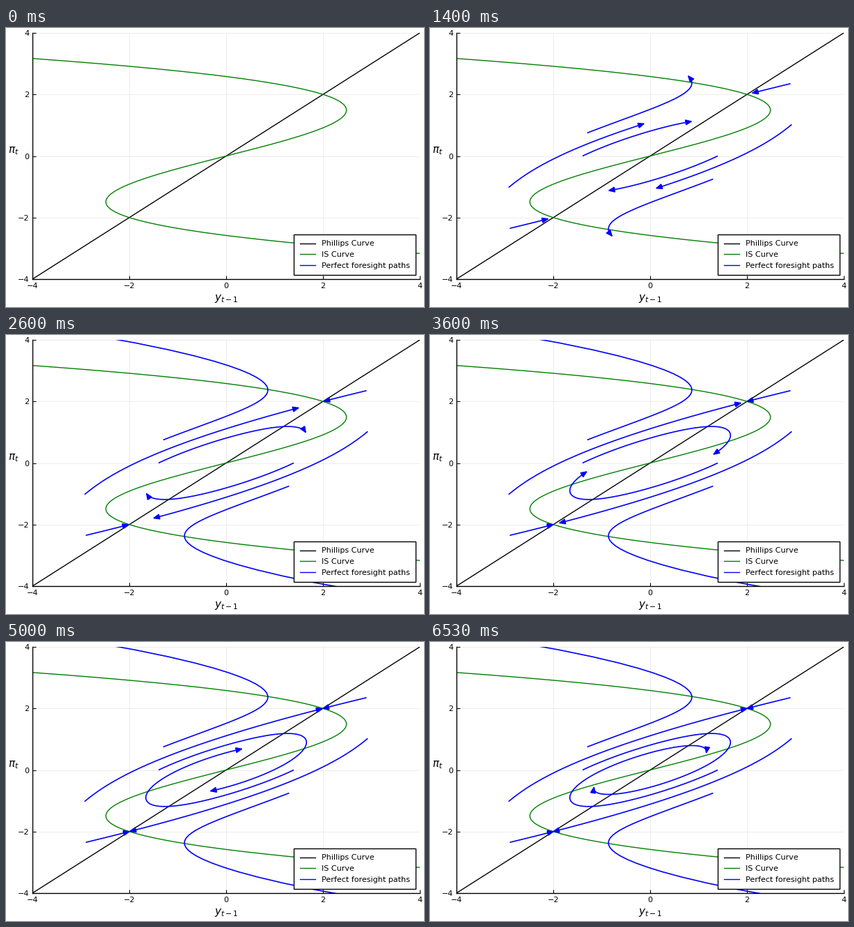
A matplotlib script that plays this animation: 600x400 px, repeating every 6.59 s.

```python
import matplotlib.pyplot as plt
import numpy as np
from matplotlib.animation import FuncAnimation
from matplotlib.patches import Polygon

FRAMES, LOOP_MS = 99, 6590
W, H, DPI = 600, 400, 100
LEFT, RIGHT, TOP, BOTTOM = 38, 594, 7, 360
LIM = 4
SCALE = np.array([RIGHT - LEFT, BOTTOM - TOP]) / (2 * LIM)  # pixels per unit

# New Keynesian model with a cubic interest rate rule
BETA, KAPPA, ETA, SIGMA, PHI, ALPHA = 0.95, 0.05, 0.95, 0.25, 0.5, 0.075


def step(y, pi):
    pi = (pi - KAPPA * y) / BETA
    demand = ETA * y + SIGMA * ((1 / BETA - PHI) * pi - ALPHA * pi**3)
    return demand / (1 + SIGMA * KAPPA / BETA), pi


def escapes(y, pi):
    for _ in range(400):
        y, pi = step(y, pi)
        if abs(pi) > 3:
            return True
    return False


def saddle_start(y, outside, inside):
    """Bisect for the inflation that puts y on a stable saddle path."""
    for _ in range(60):
        mid = (outside + inside) / 2
        if escapes(y, mid):
            outside = mid
        else:
            inside = mid
    return inside


def trace(y, pi):
    points = []
    for _ in range(FRAMES):
        y_next, pi_next = step(y, pi)
        points.append((y_next, pi))
        if abs(pi) > 8:
            break
        y, pi = y_next, pi_next
    return np.array(points)


starts = [
    (-1.5, 0.75),
    (-1.5, 0.0),
    (-3.0, saddle_start(-3.0, 0.0, -1.5)),
    (-3.0, saddle_start(-3.0, -3.0, -1.5)),
]
paths = [sign * trace(*s) for s in starts for sign in (1, -1)]

fig = plt.figure(figsize=(W / DPI, H / DPI), dpi=DPI, facecolor="white")
ax = fig.add_axes([LEFT / W, 1 - BOTTOM / H, (RIGHT - LEFT) / W, (BOTTOM - TOP) / H])
ax.set(xlim=(-LIM, LIM), ylim=(-LIM, LIM))
ticks = range(-LIM, LIM + 1, 2)
ax.set_xticks(ticks)
ax.set_yticks(ticks)
ax.tick_params(direction="in", labelsize=8)
ax.set_axisbelow(True)
ax.grid(color="black", alpha=0.1, lw=0.5)
for side in ("top", "right"):
    ax.spines[side].set_visible(False)
for side in ("left", "bottom"):
    ax.spines[side].set_linewidth(1)
ax.set_xlabel("$y_{t-1}$", fontsize=11)
ax.set_ylabel(r"$\pi_t$", fontsize=11, rotation=0)

pi = np.linspace(-LIM, LIM, 400)
is_curve = SIGMA * ((1 - PHI) * pi - ALPHA * pi**3) / (1 - ETA)
ax.plot(pi, pi, color="black", lw=1, label="Phillips Curve")
ax.plot(is_curve, pi, color="green", lw=1, label="IS Curve")
ax.plot([], [], color="blue", lw=1, label="Perfect foresight paths")
legend = ax.legend(loc="lower right", fontsize=8, borderpad=0.8, fancybox=False,
                   framealpha=1, facecolor="white", edgecolor="black")
legend.set_zorder(1000)

HEAD_LEN, HEAD_HALF = 8.33, 3.47
lines, heads = [], []
for _ in paths:
    lines += ax.plot([], [], color="blue", lw=1.2, solid_capstyle="butt")
    heads.append(ax.add_patch(Polygon(
        np.zeros((3, 2)), closed=True, color="blue", lw=1, joinstyle="miter",
        clip_on=False, zorder=999, visible=False)))


def head_shape(prev, tip):
    d = (tip - prev) * SCALE
    d /= np.hypot(*d)
    side = np.array([-d[1], d[0]]) * HEAD_HALF
    back = -d * HEAD_LEN
    return tip + np.array([back + side, (0, 0), back - side]) / SCALE


def draw(k):
    for path, line, head in zip(paths, lines, heads):
        shown = path[:k + 1] if k else path[:0]
        line.set_data(shown[:, 0], shown[:, 1])
        visible = k > 0 and bool(np.all(np.abs(shown[-1]) <= LIM))
        head.set_visible(visible)
        if visible:
            head.set_xy(head_shape(shown[-2], shown[-1]))
    return lines + heads


anim = FuncAnimation(fig, draw, frames=FRAMES, interval=LOOP_MS / FRAMES,
                     repeat=True, repeat_delay=0, blit=False)
plt.show()
```
